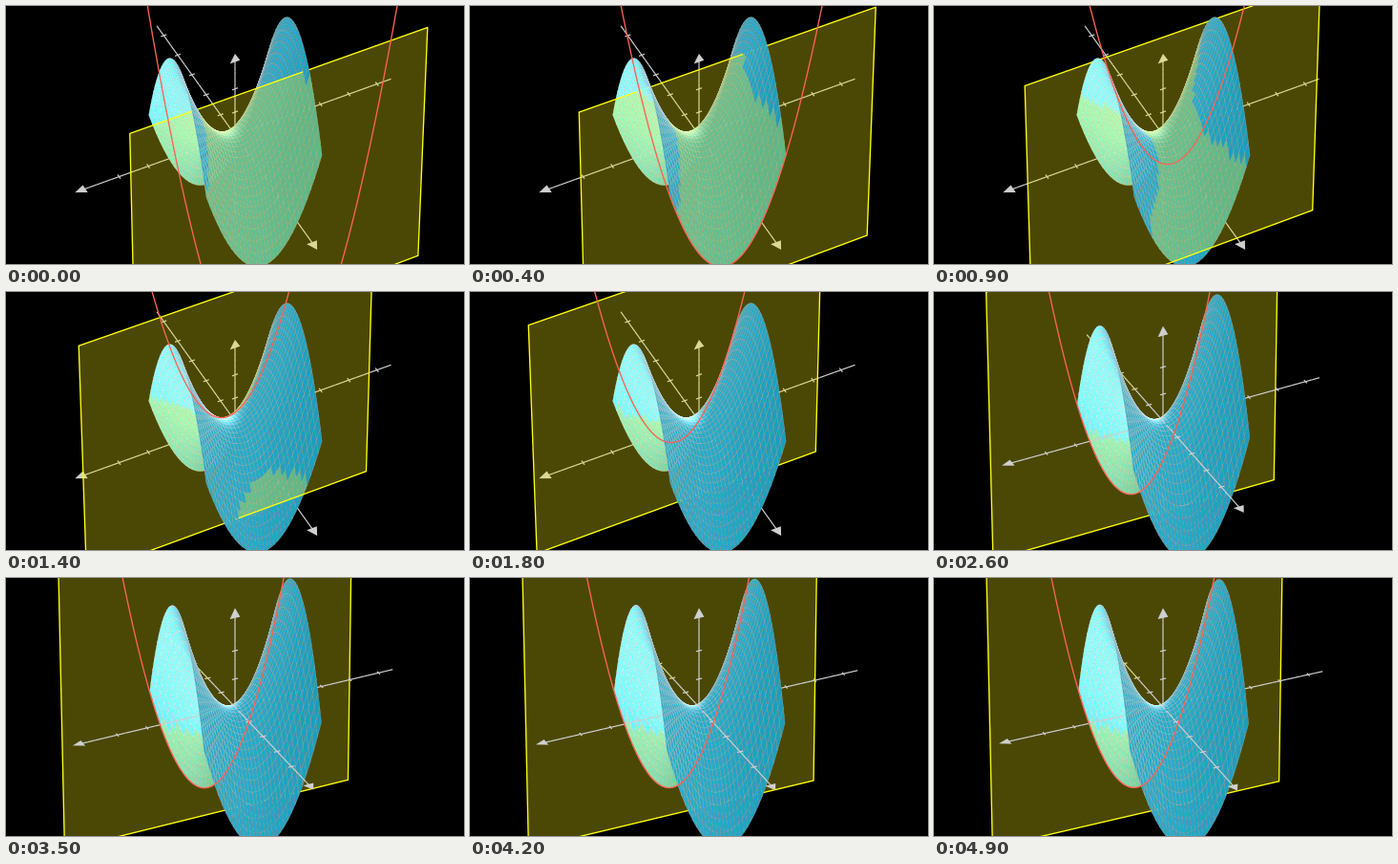
These frames come from a looping animation (480x270 px, 5000 ms). A matplotlib script:

```python
import numpy as np
import matplotlib.pyplot as plt
from matplotlib.animation import FuncAnimation
from matplotlib.collections import PolyCollection

W, H, DPI = 480, 270, 100
FRAMES, INTERVAL = 50, 100
UNIT = 33.75            # pixels per scene unit
DISTANCE = 140          # camera distance in scene units
PX = 72 / DPI           # one pixel in points

AXIS = np.array([0.81, 0.81, 0.81, 1])
YELLOW = np.array([1, 1, 0.05, 1])
PLANE_FILL = np.array([0.98, 0.94, 0.08, 0.3])
CLEAR = np.zeros(4)
BLUE = np.array([41, 171, 202]) / 255
GREY = np.array([187, 187, 187]) / 255
RED = "#fc6255"
SUN = np.array([-7, -9, 10])


def smooth(t):
    """Sigmoid easing from 0 to 1."""
    t = np.clip(t, 0, 1)
    sig = lambda v: 1 / (1 + np.exp(-v))
    low = sig(-5)
    return (sig(10 * (t - 0.5)) - low) / (1 - 2 * low)


def camera(t):
    """Rows: screen right, screen up, towards the viewer."""
    phi = np.radians(45 + 15 * smooth(t - 2))
    theta = np.radians(63.1 + max(0, t - 2))
    cp, sp, ct, st = np.cos(phi), np.sin(phi), np.cos(theta), np.sin(theta)
    return np.array([[-st, ct, 0],
                     [-cp * ct, -cp * st, sp],
                     [sp * ct, sp * st, cp]])


def project(points, cam):
    view = np.asarray(points) @ cam.T
    scale = UNIT * DISTANCE / (DISTANCE - view[..., 2:])
    return np.array([W / 2, H / 2]) + view[..., :2] * scale * [1, -1]


def make_surface(n=32, half=2):
    """Shaded quads of z = x^2 - y^2 as (points, fill, edge, width)."""
    grid = np.linspace(-half, half, n + 1)
    point = lambda x, y: (x, y, x * x - y * y)
    quads = []
    for x0, x1 in zip(grid, grid[1:]):
        for y0, y1 in zip(grid, grid[1:]):
            quad = np.array([point(x0, y0), point(x1, y0),
                             point(x1, y1), point(x0, y1)])
            x, y, _ = mid = quad.mean(axis=0)
            normal = np.array([-2 * x, 2 * y, 1])
            to_sun = SUN - mid
            cosine = normal @ to_sun / np.linalg.norm(normal) / np.linalg.norm(to_sun)
            light = 0.5 * cosine ** 3
            light *= 0.5 if light < 0 else 1
            fill = np.append(np.clip(BLUE + light, 0, 1), 1)
            edge = np.append(np.clip(GREY + light, 0, 1), 1)
            quads.append((quad, fill, edge, 0.27 * PX))
    return quads


def make_axis(along, across, reach):
    """Short pieces, ticks and a flat arrow tip for one axis."""
    along, across = np.array(along, float), np.array(across, float)
    line = lambda a, b: (np.array([a, b]), CLEAR, AXIS, 1.2 * PX)
    stops = np.arange(-reach, reach - 0.3, 0.25)
    items = [line(s * along, min(s + 0.25, reach - 0.3) * along) for s in stops]
    last = int(reach)
    items += [line(k * along - 0.1 * across, k * along + 0.1 * across)
              for k in range(-last, last) if k]
    base = (reach - 0.35) * along
    tip = np.array([reach * along, base + 0.175 * across, base - 0.175 * across])
    items.append((tip, AXIS, CLEAR, 0))
    return items


def make_plane(y):
    corners = np.array([(-5, y, -5), (5, y, -5), (5, y, 5), (-5, y, 5)], float)
    return corners, PLANE_FILL, YELLOW, 1.35 * PX


X, Y, Z = np.eye(3)
axes_items = make_axis(X, Y, 5.5) + make_axis(Y, X, 5.5) + make_axis(Z, X, 3.5)
surface_items = make_surface()
curve_x = np.linspace(-5, 5, 300)

fig = plt.figure(figsize=(W / DPI, H / DPI), dpi=DPI, facecolor="black")
ax = fig.add_axes([0, 0, 1, 1])
ax.set_xlim(0, W)
ax.set_ylim(H, 0)
ax.axis("off")
scene = PolyCollection([], joinstyle="round", snap=False)
ax.add_collection(scene, autolim=False)
curve, = ax.plot([], [], color=RED, lw=1.35 * PX, zorder=5, snap=False)


def update(frame):
    t = frame * INTERVAL / 1000
    cam = camera(t)
    slice_y = max(-2, 3 - 2.5 * t)
    items = axes_items + surface_items + [make_plane(slice_y)]
    depth = np.array([item[0].mean(axis=0) @ cam[2] for item in items])
    if t < 2:
        depth[:len(axes_items)] -= 1000   # axes stay behind everything at first
    points, fills, edges, widths = zip(*(items[i] for i in np.argsort(depth, kind="stable")))

    scene.set_verts([project(p, cam) for p in points])
    scene.set_facecolor(fills)
    scene.set_edgecolor(edges)
    scene.set_linewidth(widths)

    path = np.column_stack([curve_x, np.full_like(curve_x, slice_y),
                            curve_x ** 2 - slice_y ** 2])
    curve.set_data(*project(path, cam).T)
    return scene, curve


anim = FuncAnimation(fig, update, frames=FRAMES, interval=INTERVAL,
                     repeat=True, repeat_delay=0, blit=False)
plt.show()
```
